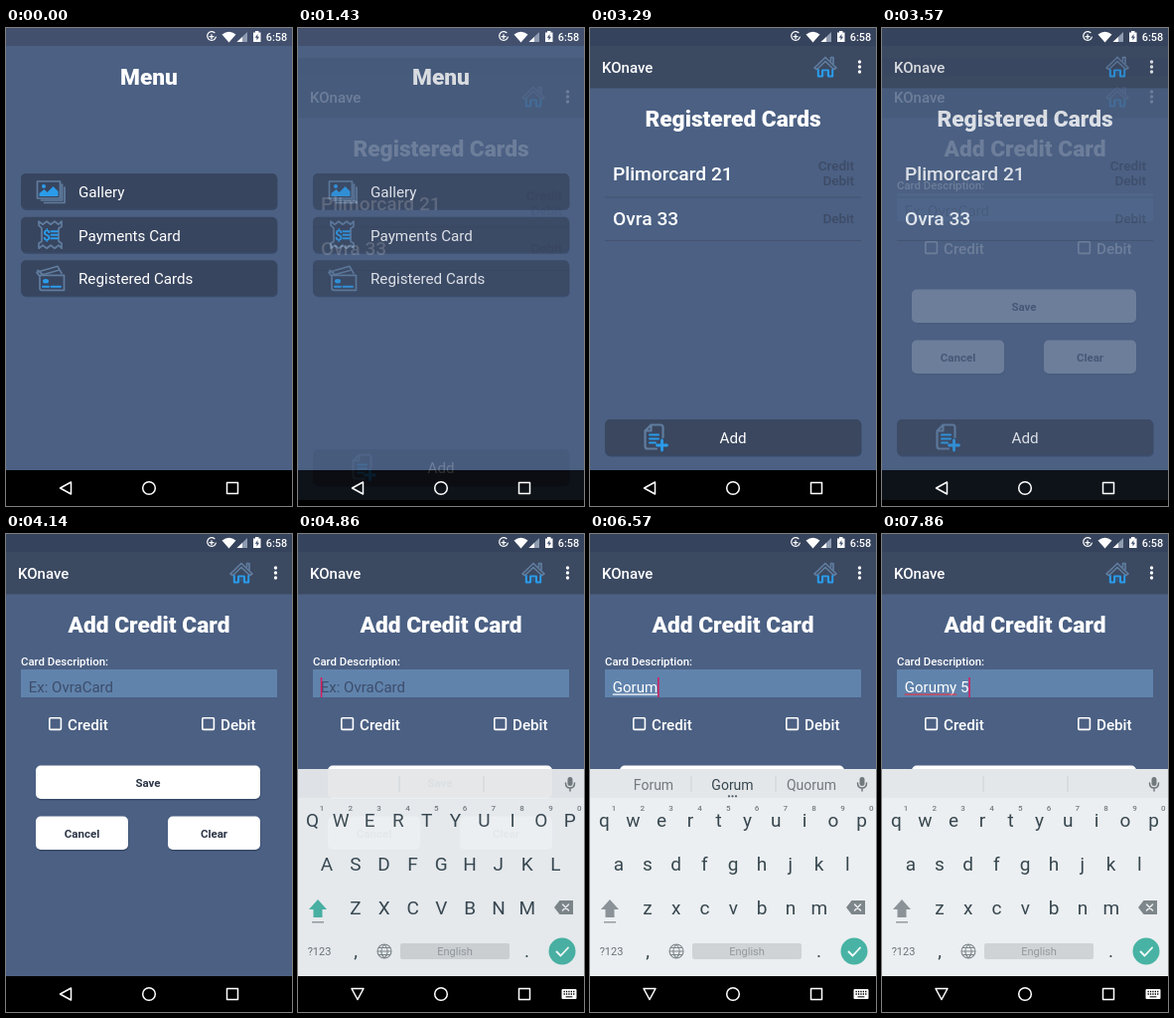
An HTML page that plays this animation: 288 by 480 pixels, repeating every 8000 ms.

```html
<!DOCTYPE html>
<html lang="en">
<head>
<meta charset="utf-8">
<title>Card app</title>
<style>
  html, body { margin: 0; width: 100%; height: 100%; overflow: hidden; background: #4b6083; }
  svg { display: block; width: 100vw; height: 100vh; }
  text { font-family: Roboto, sans-serif; white-space: pre; }
  .line { fill: none; stroke-width: 1.5; stroke-linejoin: round; stroke-linecap: round; }
  .dim { stroke: #607d9f; stroke-width: 1.7; }
  .blue { stroke: #2b9bea; stroke-width: 2; }
  .white { stroke: #fff; }
</style>
</head>
<body>
<svg id="stage" viewBox="0 0 288 480"></svg>
<script>
const LOOP = 8000, STEP = 1000 / 7;
const PAGE = '#4b6083', BAR = '#3b4961', ROW = '#38455f', BLUE = '#2b9bea', INK = '#37474f';

const rect = (x, y, w, h, fill, extra = '') =>
  `<rect x="${x}" y="${y}" width="${w}" height="${h}" fill="${fill}" ${extra}/>`;
const text = (x, y, size, str, { fill = '#fff', weight = 400, anchor = 'start', extra = '' } = {}) =>
  `<text x="${x}" y="${y}" font-size="${size}" font-weight="${weight}" fill="${fill}" text-anchor="${anchor}" ${extra}>${str}</text>`;
const mid = (x, y, size, str, opts) => text(x, y, size, str, { anchor: 'middle', ...opts });
const line = (d, cls, extra = '') => `<path class="line ${cls}" d="${d}" ${extra}/>`;
const shape = (d, fill) => `<path d="${d}" fill="${fill}"/>`;
const at = (x, y, body) => `<g transform="translate(${x} ${y})">${body}</g>`;
const title = (y, str) => mid(144, y, 22.7, str, { weight: 900 });

// Raised panel with a soft lower edge
const panel = (x, y, w, h, fill) =>
  rect(x + 0.5, y + 1.5, w, h, '#26344e', 'rx="5" opacity=".5"') + rect(x, y, w, h, fill, 'rx="5"');

const icons = {
  gallery:
    line('M1 1H24V18H1Z M26 4V20H5 M28.5 7V22.5H8', 'dim') +
    shape('M3 16V13L8 9L11 12L17 6L22 11V16Z', BLUE) +
    `<circle cx="7.5" cy="6" r="2" fill="${BLUE}"/>`,
  receipt:
    line('M1 5V1L5 4L9 1L13 4L17 1L21 4L24 1V6L21 8V21L24 23V28L21 25L17 28L13 25L9 28L5 25L1 28V23L4 21V8Z', 'dim') +
    mid(9, 19.5, 14, '$', { fill: BLUE, weight: 700 }) +
    line('M13.5 11H20M13.5 14.5H20M13.5 18H20', 'blue'),
  cards:
    line('M3 10L1 7L22 1L26 8', 'dim') + line('M2 5L7 9M5 10L23 5', 'dim') +
    line('M4 10H28.5V25H6Q4 25 4 23Z', 'dim') +
    `<ellipse cx="10" cy="16" rx="3" ry="2.2" fill="${BLUE}"/>` +
    line('M7 21.5H13M15.5 21.5H25', 'blue'),
  home:
    line('M1 13L12 2.5L23 13L20.5 14.5L12 6.5L3.5 14.5Z', 'dim') +
    line('M17.5 6V2.5H20V9', 'dim') +
    line('M4.8 15V21.5H9V15.5H15V21.5H19.2V15', 'blue') +
    shape('M10 16.5H14V21H10Z', '#33567c'),
  addPage:
    line('M13 25.5H4Q1.5 25.5 1.5 23V7.5L7.5 1.5H17Q19.5 1.5 19.5 4V14M7.5 2V7.5H2', 'dim', 'style="stroke-width:2.2"') +
    line('M6 11.5H15M6 15.5H15M6 19.5H12', 'blue') +
    line('M18.5 17V27M13.5 22H23.5', 'blue', 'style="stroke-width:2.8"')
};

const appScreen = body =>
  rect(0, 0, 288, 444, PAGE) + rect(0, 0, 288, 61, '#34425b', 'opacity=".35"') +
  rect(0, 0, 288, 60, BAR) + rect(0, 0, 288, 18, '#36435c') +
  text(12, 45, 15, 'KOnave', { weight: 500 }) + at(225, 27, icons.home) +
  [34, 39, 44].map(y => `<circle cx="271.5" cy="${y}" r="1.7" fill="#fff"/>`).join('') + body;

const menuRow = (y, icon, dx, dy, label) =>
  panel(15, y, 258, 35.5, ROW) + at(30 + dx, y + dy, icons[icon]) + text(73, y + 24, 15.2, label);

const menuScreen =
  rect(0, 0, 288, 444, PAGE) + rect(0, 0, 288, 18, '#42506e') + title(57, 'Menu') +
  menuRow(146, 'gallery', 0.5, 7, 'Gallery') +
  menuRow(189.7, 'receipt', 2, 3.5, 'Payments Card') +
  menuRow(233.3, 'cards', 0, 5, 'Registered Cards');

const kind = (y, str) => text(266, y, 13.5, str, { anchor: 'end', fill: '#3d4b66', weight: 500 });
const listScreen = appScreen(
  title(99, 'Registered Cards') +
  text(23, 152.7, 19.2, 'Plimorcard 21', { weight: 500 }) + kind(142.5, 'Credit') + kind(158, 'Debit') +
  text(23, 198.2, 19.2, 'Ovra 33', { weight: 500 }) + kind(195.5, 'Debit') +
  [169.5, 213].map(y => rect(15, y, 258, 1, '#435371')).join('') +
  panel(15, 393, 258, 36, '#3a475f') + at(54, 397, icons.addPage) + mid(144, 417, 15.2, 'Add'));

const check = (x, label) =>
  rect(x + 0.8, 184.8, 11.6, 11.6, 'none', 'rx="1" stroke="#fff" stroke-width="1.6"') +
  text(x + 19, 196.5, 15.2, label, { weight: 500 });
const button = (x, y, w, label) =>
  panel(x, y, w, 33.5, '#fff') + mid(x + w / 2, y + 21, 11.5, label, { fill: '#2c3546', weight: 700 });
const formScreen = appScreen(
  title(99, 'Add Credit Card') +
  text(15, 132, 11.4, 'Card Description:', { weight: 500 }) +
  rect(15, 136, 258, 28, '#6083ac') +
  text(22.8, 159, 15, 'Ex: OvraCard', { fill: '#3d4d6b', extra: 'id="hint"' }) +
  text(22.8, 159, 15, '', { extra: 'id="typed"' }) +
  rect(22.8, 160.5, 0, 1.2, '#fff', 'id="underline"') +
  rect(22.8, 144, 1.5, 20, '#d81b60', 'id="cursor"') +
  check(43, 'Credit') + check(197, 'Debit') +
  button(30, 232.5, 226, 'Save') + button(30, 283.5, 93, 'Cancel') + button(163, 283.5, 93, 'Clear'));

const keyRow = (keys, x0, y) => [...keys].map((key, i) =>
  mid(x0 + i * 28.8, y, 19, key, { fill: INK, extra: 'class="key"' })).join('');
const keyboard =
  rect(0, 236, 288, 208, '#eceff1') + rect(0, 236, 288, 29, '#e4e7e9') +
  [102, 187].map(x => rect(x - 0.5, 243, 1, 16, '#cfd4d6')).join('') +
  [64, 143.5, 223].map((x, i) =>
    mid(x, 256.5, 14, '', { fill: i === 1 ? INK : '#70797e', extra: 'class="suggestion"' })).join('') +
  `<g id="dots" fill="#4a565c">${[140, 143.5, 147].map(x => `<circle cx="${x}" cy="263.3" r="1.1"/>`).join('')}</g>` +
  rect(271.5, 244, 5, 9, '#71797d', 'rx="2.5"') +
  line('M269.5 250Q269.5 255 274 255T278.5 250M274 255V258', '', 'stroke="#71797d"') +
  keyRow('qwertyuiop', 14.5, 294) + keyRow('asdfghjkl', 29, 338) + keyRow('zxcvbnm', 58, 382) +
  [...'1234567890'].map((n, i) => mid(24 + i * 28.8, 278, 8, n, { fill: '#747d82', weight: 500 })).join('') +
  '<path id="shift" d="M20 367L29 377H24.5V385H15.5V377H11Z"/>' + rect(14, 389, 12, 1.6, '#9aa1a5') +
  shape('M258 375L263.5 368H277V382H263.5Z', '#7d868a') +
  line('M266.5 372L272.5 378M272.5 372L266.5 378', '', 'stroke="#eceff1"') +
  mid(21.5, 423, 11, '?123', { fill: '#687378' }) + mid(58, 425, 19, ',', { fill: INK }) + mid(230.5, 425, 19, '.', { fill: INK }) +
  line('M80 419A7 7 0 1 0 94 419A7 7 0 1 0 80 419H94M87 412Q80.5 419 87 426Q93.5 419 87 412M81.5 415.5H92.5M81.5 422.5H92.5', '', 'stroke="#7d868a" style="stroke-width:1.1"') +
  rect(103, 411, 110, 16, '#d0d3d5', 'rx="2"') + mid(158, 423, 11, 'English', { fill: '#92999d' }) +
  '<circle cx="266" cy="419" r="13.5" fill="#48b3a4"/>' + line('M260.5 419.5L264.5 423.5L272 415.5', 'white', 'style="stroke-width:1.8"');

const statusIcons =
  line('M210 4.7A4.4 4.4 0 1 0 211.3 9.2M207 6.7V10.7M205 8.7H209', 'white', 'style="stroke-width:1.2"') +
  shape('M217.5 6.5Q224.5 1 231.5 6.5L224.5 14.5Z', '#fff') +
  shape('M243 4V14H232.5Z', '#8f9bb0') + shape('M238 9V14H232.5Z', '#fff') +
  shape('M249 4.5H251V3H254.5V4.5H256.5V14H249Z', '#fff') +
  shape('M253.5 6L250.8 9.7H252.5V12.5L255 8.7H253.3Z', '#42506e') +
  text(261.8, 13, 10.9, '6:58', { weight: 500 });

const navIcons =
  line('M54.5 462L65.5 456V468Z', 'white', 'id="back"') +
  '<circle class="line white" cx="144" cy="462" r="6.3"/>' + line('M222.5 456.5H233.5V467.5H222.5Z', 'white') +
  `<g id="imeIcon">${rect(265.5, 457, 15, 10, '#fff', 'rx="1"')}` +
  line('M267.5 459.5H279M267.5 462H279', '', 'stroke="#000" stroke-dasharray="1.3 1.1" style="stroke-linecap:butt"') +
  line('M270 464.8H276', '', 'stroke="#000" style="stroke-width:1"') + '</g>';

// Entering windows slide over the black navigation bar, under its icons
const layer = (id, body) => `<g id="${id}">${body}</g>`;
document.getElementById('stage').innerHTML =
  rect(0, 444, 288, 36, '#000') + menuScreen +
  layer('list', listScreen) + layer('form', formScreen) + layer('ime', keyboard) +
  statusIcons + navIcons;

const el = id => document.getElementById(id);
const set = (id, attrs) => { for (const name in attrs) el(id).setAttribute(name, attrs[name]); };
const keys = [...document.querySelectorAll('.key')];
const suggestions = [...document.querySelectorAll('.suggestion')];

// Entering layers: first step, then [offset, opacity] per step
const windowIn = [[30, 0.19], [9, 0.85], [1.5, 1], [0, 1]];
const entrances = {
  list: [10, windowIn],
  form: [25, windowIn],
  ime: [33, [[18, 0.4], [0, 0.96], [0, 1]]]
};
// Typing: step, field value, suggestion strip
const typing = [
  [33, '', []],
  [38, 'G', ['Go', 'G', 'Get']],
  [40, 'Go', ['Good', 'Go', 'Got']],
  [42, 'Gor', ['For', 'Gor', 'Got']],
  [44, 'Goru', ['Guru', 'Goru', 'Group']],
  [45, 'Gorum', ['Forum', 'Gorum', 'Quorum']],
  [47, 'Gorumy', ['Forum', 'Gorumy', 'Gummy']],
  [49, 'Gorumy ', []],
  [53, 'Gorumy 5', []]
];

function enter(id, step) {
  const [start, poses] = entrances[id];
  const [dy, opacity] = step < start ? [0, 0] : poses[Math.min(step - start, poses.length - 1)];
  set(id, { transform: `translate(0 ${dy})`, opacity });
}

function render(step) {
  Object.keys(entrances).forEach(id => enter(id, step));
  const focused = step >= typing[0][0];
  const [since, value, words] = typing.filter(([start]) => start <= step).pop() || typing[0];
  const composing = words.length > 0;

  const typed = el('typed');
  typed.textContent = value;
  const width = value ? typed.getComputedTextLength() : 0;
  const wordWidth = value ? typed.getSubStringLength(0, value.trimEnd().split(' ')[0].length) : 0;
  const cursorOn = focused && (step - since) * STEP % 1000 < 500;
  set('hint', { opacity: value ? 0 : 1 });
  set('underline', { width: wordWidth, fill: composing ? '#fff' : '#e0384a' });
  set('cursor', { x: 22.8 + width, opacity: cursorOn ? 1 : 0 });

  for (const key of keys) key.textContent = value ? key.textContent.toLowerCase() : key.textContent.toUpperCase();
  suggestions.forEach((node, i) => { node.textContent = words[i] || ''; });
  set('dots', { opacity: composing ? 1 : 0 });
  set('shift', { fill: value ? '#8b9398' : '#48b3a4' });
  set('back', { transform: focused ? 'rotate(-90 60 462)' : '' });
  set('imeIcon', { opacity: focused ? 1 : 0 });
}

const begin = performance.now();
let shown = -1;
function tick(now) {
  const time = Math.max(0, now - begin) % LOOP;
  const step = Math.floor(time / STEP + 0.1) % 56;
  if (step !== shown) render(shown = step);
  requestAnimationFrame(tick);
}
render(0);
requestAnimationFrame(tick);
</script>
</body>
</html>
```
